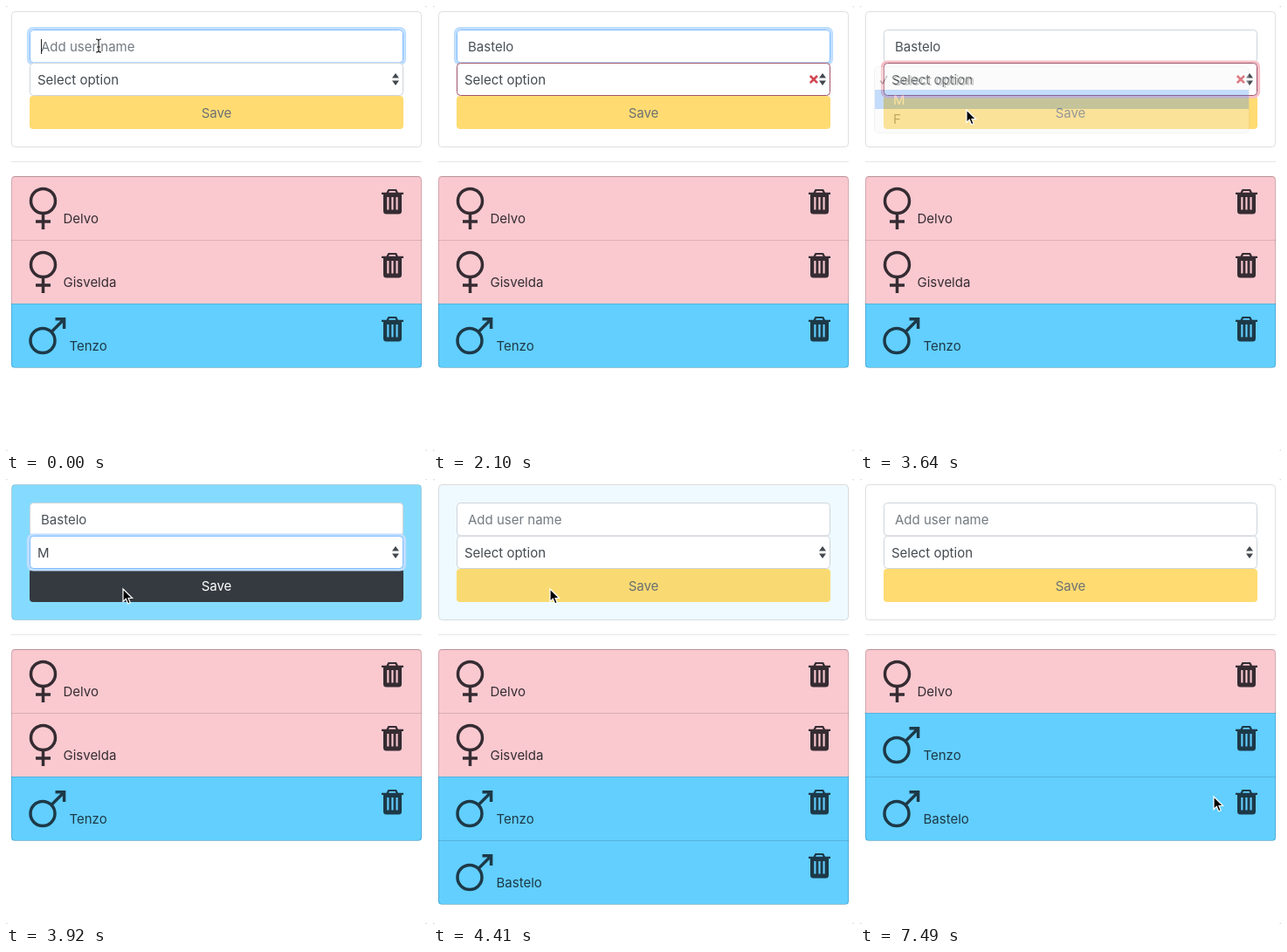
These frames come from a looping animation (482 by 510 pixels, 7.56 s). An HTML page:

```html
<!DOCTYPE html>
<html lang="en">
<head>
<meta charset="utf-8">
<title>User list</title>
<style>
  html, body { margin: 0; width: 100%; height: 100%; overflow: hidden; background: #d4d4d4; }
  svg { display: block; width: 482px; height: 510px; }
  text { font: 15px Inter, "Open Sans", sans-serif; white-space: pre; }
</style>
</head>
<body>
<svg id="stage" viewBox="0 0 482 510">
  <defs>
    <clipPath id="listClip"><rect id="listShape" x="6" y="195" width="470" rx="4"/></clipPath>
    <g id="female" fill="none" stroke-width="3.5">
      <circle cx="42.5" cy="28.5" r="14"/>
      <path d="M42.5 42.5V61M34 52H51"/>
    </g>
    <g id="male" fill="none" stroke-width="3.5">
      <circle cx="42" cy="42.5" r="14"/>
      <path d="M52 32.5L66 18.5M56.5 17.8H66.6V29"/>
    </g>
    <g id="trash">
      <path d="M430 21V18.8H435.5L437.5 15H447L449 18.8H455V21ZM438 18.8H446.5L445.5 17H439Z" fill-rule="evenodd"/>
      <path fill-rule="evenodd" d="M432 21H453V40Q453 43.5 449.5 43.5H435.5Q432 43.5 432 40ZM436.3 24V38.5H438.4V24ZM441.4 24V38.5H443.5V24ZM446.5 24V38.5H448.6V24Z"/>
    </g>
  </defs>

  <rect width="482" height="510" rx="3" fill="#fff"/>
  <rect id="card" x="6.5" y="6.5" width="469" height="155" rx="4" stroke="#000" stroke-opacity=".125"/>

  <rect id="nameRing" x="25.5" y="25.5" width="431" height="41" rx="5.5" fill="none" stroke="#bfdeff" stroke-width="3.2"/>
  <rect id="nameBox" x="27.5" y="27.5" width="427" height="37.5" rx="4" fill="#fff"/>
  <text id="name" x="40" y="52"></text>
  <path id="caret" stroke="#222" stroke-width="1"/>

  <g id="button">
    <rect id="buttonBox" x="27" y="103" width="428" height="38" rx="4"/>
    <text id="save" x="241" y="128" text-anchor="middle">Save</text>
  </g>
  <rect id="buttonRing" x="25.5" y="101.5" width="431" height="41" rx="5.5" fill="none" stroke="#5c9fcd" stroke-width="3"/>

  <rect id="optionRing" x="25.5" y="64" width="431" height="40" rx="5.5" fill="none" stroke-width="3.2"/>
  <rect id="optionBox" x="27.5" y="65.5" width="427" height="37" rx="4" fill="#fff"/>
  <text id="option" x="36" y="90" fill="#43494f"></text>
  <path d="M442 82.5L446 77L450 82.5ZM442 85.5L446 91L450 85.5Z" fill="#42484e"/>
  <path id="cross" d="M431.8 80L440 88.2M440 80L431.8 88.2" stroke="#d34653" stroke-width="2.6"/>

  <path d="M6 178.5H476" stroke="#e5e5e5"/>
  <g id="list" clip-path="url(#listClip)"></g>
  <rect id="listEdge" x="6.5" y="195.5" width="469" rx="4" fill="none" stroke="#000" stroke-opacity=".16"/>

  <g id="menu">
    <rect x="16.5" y="69.5" width="429" height="76" rx="5" fill="#f5f5f2" stroke="#000" stroke-opacity=".15"/>
    <rect id="hover" x="17" width="428" height="22" fill="#3e8ff5"/>
    <path d="M23 85.5L26 89L31 80" fill="none" stroke="#333" stroke-width="1.5"/>
    <g id="items"></g>
  </g>

  <circle id="press" r="21.5" fill="none" stroke="#000" stroke-width="1.5"/>
  <path id="arrow" d="M0 0V14.5L3.3 11.4L5.6 16.8L8.2 15.7L6 10.5H10.6Z" fill="#000" stroke="#fff" stroke-width="1.2"/>
  <path id="beam" d="M-3 -7Q0 -7 0 -5Q0 -7 3 -7M0 -5V6M-3 8Q0 8 0 6Q0 8 3 8M-2 2H2" fill="none" stroke="#222" stroke-width="1.2"/>
</svg>

<script>
const LOOP = 7560, STEP = 70;
const TYPE = 530, KEY_GAP = 155, PICK_FOCUS = 2660, OPEN = 2800;
const CLOSE = 3500, CHOSEN = 3660, SAVE_DOWN = 3970, SAVED = 4110, REMOVED = 6230;
const NEW_NAME = "Bastelo";
const PINK = [250, 201, 208], BLUE = [98, 207, 255], CARD_BLUE = [106, 211, 255];
const WHITE = [255, 255, 255], YELLOW = [255, 201, 40], DARK = [52, 58, 64];
const INK = [33, 37, 41], LINE = [206, 212, 218], FOCUS = [128, 189, 255], BAD = [160, 84, 108];

const users = [
  { name: "Delvo", sex: "female", from: 0, to: LOOP },
  { name: "Gisvelda", sex: "female", from: 0, to: REMOVED },
  { name: "Tenzo", sex: "male", from: 0, to: LOOP },
  { name: NEW_NAME, sex: "male", from: SAVED, to: LOOP }
];
const presses = [[2590, 2730], [3290, 3430], [SAVE_DOWN, SAVED], [6090, REMOVED]];
// Pointer stops: time, x, y
const track = [
  [0, 106, 45], [2170, 106, 45], [2560, 113, 84], [2900, 113, 84], [3200, 118, 107],
  [3500, 118, 108], [3640, 122, 119], [3850, 134, 126], [4720, 134, 126],
  [5950, 446, 299], [6230, 446, 299], [6440, 430, 374], [6580, 428, 374],
  [6790, 428, 374], [6930, 405, 364]
];

const NS = "http://www.w3.org/2000/svg";
const ui = {};
document.querySelectorAll("[id]").forEach(el => ui[el.id] = el);

function add(parent, tag, attrs, text = "") {
  const el = document.createElementNS(NS, tag);
  set(el, attrs);
  el.textContent = text;
  return parent.appendChild(el);
}
function set(el, attrs) {
  for (const key in attrs) el.setAttribute(key, attrs[key]);
}
const show = (el, visible) => el.style.display = visible ? "" : "none";
const clamp = v => Math.min(1, Math.max(0, v));
const mix = (a, b, p) => a.map((v, i) => v + (b[i] - v) * p);
const rgb = c => `rgb(${c.map(Math.round)})`;
const between = (t, a, b) => t >= a && t < b;

// The CSS "ease" curve
function ease(x) {
  x = clamp(x);
  let lo = 0, hi = 1;
  for (let i = 0; i < 16; i++) {
    const m = (lo + hi) / 2;
    const bx = .75 * m * (1 - m) + m ** 3;
    if (bx < x) lo = m; else hi = m;
  }
  return .3 * lo * (1 - lo) ** 2 + 3 * lo * lo * (1 - lo) + lo ** 3;
}
const during = (t, from, to, ms = 150) => ease((t - from) / ms) - ease((t - to) / ms);

function pointer(t) {
  const i = track.findIndex(p => p[0] > t);
  if (i < 0) return track[track.length - 1].slice(1);
  const a = track[i - 1], b = track[i];
  const p = clamp((t - a[0]) / (b[0] - a[0]));
  return mix(a, b, p * p * (3 - 2 * p)).slice(1);
}

for (const user of users) {
  const male = user.sex === "male";
  const ink = male ? "#1d3948" : "#352c32";
  const row = user.row = add(ui.list, "g", { fill: ink });
  add(row, "rect", { x: 6, width: 470, height: 73.5, fill: rgb(male ? BLUE : PINK) });
  add(row, "path", { d: "M6 .5H476", stroke: "#000", "stroke-opacity": .13 });
  add(row, "use", { href: "#" + user.sex, stroke: ink });
  add(row, "use", { href: "#trash" });
  add(row, "text", { x: male ? 72.5 : 65.5, y: 54 }, user.name);
}
const items = ["Select option", "M", "F"].map((label, i) =>
  add(ui.items, "text", { x: 38, y: 90.5 + 22 * i }, label));

function drawForm(t) {
  const blue = during(t, CHOSEN, SAVED, 500);
  set(ui.card, { fill: rgb(mix(WHITE, CARD_BLUE, blue)) });

  const nameFocus = during(t, -LOOP, PICK_FOCUS);
  set(ui.nameRing, { opacity: nameFocus });
  set(ui.nameBox, { stroke: rgb(mix(LINE, FOCUS, nameFocus)) });
  const count = t < SAVED ? Math.max(0, Math.floor((t - TYPE) / KEY_GAP) + 1) : 0;
  const typed = NEW_NAME.slice(0, count);
  ui.name.textContent = typed || "Add user name";
  set(ui.name, { fill: typed ? "#495057" : "#737a80" });
  const caretX = 40.5 + (typed ? ui.name.getComputedTextLength() : 0);
  set(ui.caret, { d: `M${caretX} 38V55` });
  show(ui.caret, t < 280 || between(t, 490, 1960) || between(t, 2460, PICK_FOCUS));

  const bad = during(t, TYPE, CHOSEN);
  const optionFocus = during(t, PICK_FOCUS, SAVE_DOWN);
  const edge = mix(LINE, FOCUS, optionFocus);
  set(ui.optionBox, { stroke: rgb(mix(edge, BAD, bad)) });
  set(ui.optionRing, { opacity: optionFocus, stroke: rgb(mix([191, 222, 255], [246, 192, 201], bad)) });
  show(ui.cross, between(t, TYPE, CHOSEN));
  const chosen = between(t, CHOSEN, SAVED);
  ui.option.textContent = chosen ? "M" : "Select option";

  const dark = during(t, CHOSEN, SAVED);
  set(ui.button, { opacity: chosen ? 1 : .65 });
  set(ui.buttonBox, { fill: rgb(mix(YELLOW, DARK, dark)) });
  set(ui.save, { fill: rgb(mix(INK, WHITE, dark)) });
  set(ui.buttonRing, { opacity: during(t, SAVE_DOWN, SAVED) });
}

function drawList(t) {
  let count = 0;
  for (const { row, from, to } of users) {
    const here = between(t, from, to);
    show(row, here);
    if (here) set(row, { transform: `translate(0 ${195 + 73 * count++})` });
  }
  set(ui.listShape, { height: 73 * count + 1 });
  set(ui.listEdge, { height: 73 * count });
}

function drawMenu(t, y) {
  show(ui.menu, between(t, OPEN, CLOSE + 200));
  set(ui.menu, { opacity: 1 - clamp((t - CLOSE) / 200) });
  const active = y > 96 ? 1 : 0;
  set(ui.hover, { y: 74 + 22 * active });
  items.forEach((el, i) => set(el, { fill: i === active ? "#fff" : "#333" }));
}

function drawPointer(t, x, y) {
  const visible = !between(t, 490, 2170), overName = y < 65;
  show(ui.arrow, visible && !overName);
  show(ui.beam, visible && overName);
  for (const el of [ui.arrow, ui.beam]) set(el, { transform: `translate(${x} ${y})` });
  show(ui.press, presses.some(([a, b]) => between(t, a, b)));
  set(ui.press, { cx: x - 1, cy: y + 1 });
}

function render(t) {
  const [x, y] = pointer(t);
  drawForm(t);
  drawList(t);
  drawMenu(t, y);
  drawPointer(t, x, y);
}

const start = performance.now();
function tick() {
  const t = (performance.now() - start) % LOOP;
  render(Math.floor(t / STEP) * STEP);
  requestAnimationFrame(tick);
}
tick();
</script>
</body>
</html>
```
